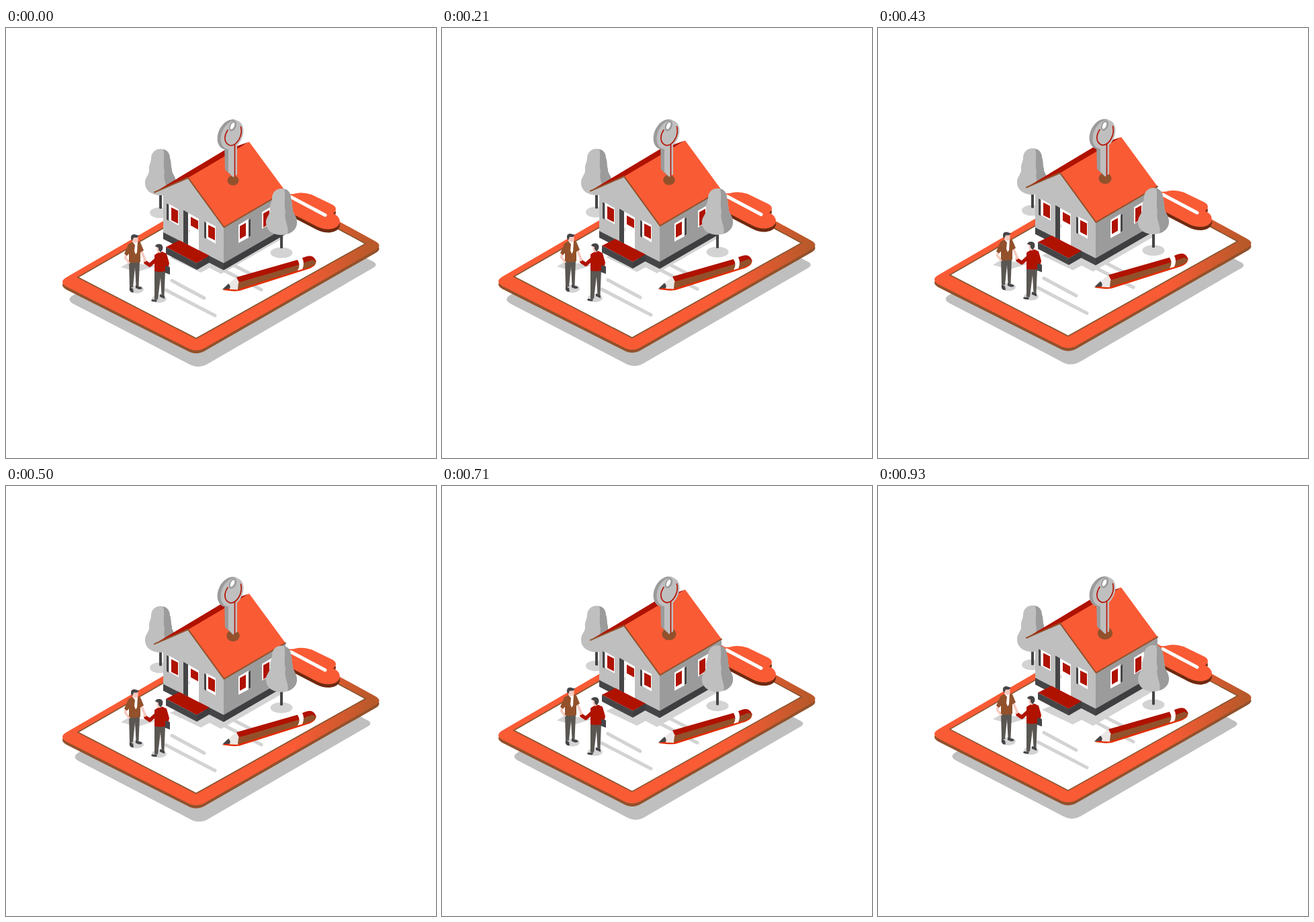
Animation, 640 px wide and 640 px high, one loop 1000 ms. Source, as an HTML page:

```html
<!DOCTYPE html>
<html lang="en">
<head>
<meta charset="utf-8">
<title>House deal</title>
<style>
  html, body { margin: 0; height: 100%; overflow: hidden; background: #fff; }
  svg { display: block; width: 100%; height: 100%; }
  .orange { fill: #f95b35; }
  .red { fill: #b01200; }
  .brown { fill: #92512b; }
  .light { fill: #bfbfbf; }
  .mid { fill: #9b9b9b; }
  .dark { fill: #454547; }
  .pale { fill: #d3d3d3; }
  .white { fill: #fff; }
  .skin { fill: #f5c9bf; }
  .pants { fill: #5a5652; }
  .line { fill: none; stroke-linecap: round; stroke-linejoin: round; }
</style>
</head>
<body>
<svg viewBox="0 0 640 640">
  <defs>
    <linearGradient id="rim" gradientUnits="userSpaceOnUse" x1="430" y1="0" x2="545" y2="0">
      <stop stop-color="#f95b35"/><stop offset="1" stop-color="#b9592a"/>
    </linearGradient>
    <path id="slab" d="M90 371Q78 378 90 385L270 476Q283 483.500 296 476L549 331Q562 324 549 317L372 220Q359 213 346 222Z"/>
    <path id="clip" d="M410 248L428 247Q440 243 455 248L486 263Q493 267 490 273L487 276Q497 280 497 289Q495 298 482 299.500Q472 300 462 295L410 268Z"/>
    <g id="tree">
      <rect class="dark" x="-2" y="66" width="4" height="23" rx="1.500"/>
      <path class="light" d="M0 0C8 0 14 6 14 14C16 18 15 24 17 31C16 36 24 42 23 52C22 62 12 69 0 69C-13 69-23 62-23 51C-24 43-16 38-17 31C-18 24-14 20-14 14C-14 6-8 0 0 0Z"/>
      <path class="mid" d="M4 .6C11 2 14 8 14 14C16 18 15 24 17 31C16 36 24 42 23 52C22 60 17 65 9 67.500C12 56 3 48 6 34C3 22 7 12 4 .6Z"/>
    </g>
  </defs>

  <g id="shade">
    <path class="light" d="M101 397Q88 404 101 411L272 500Q286 508 300 500L543 359Q558 352 543 346L360 246Z"/>
  </g>

  <g id="board">
    <use href="#slab" y="4.500" class="brown"/>
    <use href="#slab" fill="url(#rim)"/>
    <path d="M107 371L283 462L535 321L359 226Z" fill="#fff" stroke="#86542f" stroke-width="1.600"/>
    <use href="#clip" y="5" fill="#6e2a10"/>
    <use href="#clip" class="orange"/>
    <path class="line" d="M424 251.500L475 278.500" stroke="#fff" stroke-width="5"/>
    <ellipse class="pale" cx="229" cy="275" rx="15" ry="8"/>
    <ellipse class="pale" cx="410" cy="334.500" rx="16.500" ry="8"/>
    <path class="line" d="M247 376L295 402M238 390L311 428M298 347L380 389.500M325 346L370 369" stroke="#d3d3d3" stroke-width="5"/>
    <path class="pale" d="M244 342L290 364L303 357L320 366L414 312L340 300Z"/>
    <path class="pale" d="M171 356L183 349L224 354L195 363Z"/>
    <ellipse class="pale" cx="194" cy="389" rx="11" ry="6"/>
    <ellipse class="pale" cx="228" cy="403" rx="11" ry="6"/>
  </g>

  <use id="backTree" href="#tree"/>

  <g id="house">
    <path class="red" d="M220 245L325 182L362 169.500L272 224Z"/>
    <path class="light" d="M234 239L271 222L324 296V351L234 304Z"/>
    <path class="mid" d="M324 296L416 243V298L324 351Z"/>
    <path class="dark" d="M234 304L324 350V360.500L234 314Z"/>
    <path fill="#3e3e40" d="M324 350L416 297V307L324 360.500Z"/>
    <path class="orange" d="M271 223L362 169.500L416 243L324.500 296.500Z"/>
    <path class="line" d="M221 244.500L271 223L324.500 296.500L416 243" stroke="#92512b" stroke-width="2"/>

    <path class="white" d="M243 262L257 270V294L243 286ZM298 288L312 295V321L298 313ZM271 275L287 284V333L271 324Z"/>
    <path class="red" d="M246 267L256 272V291L246 286ZM301 293L311 298V316L301 311ZM275 281L286 287V300L275 294Z"/>
    <path class="dark" d="M239 261L242 263V287L239 285ZM295 288L298 290V314L295 312ZM264 271L271 275V323L264 319Z"/>
    <path class="line" d="M272.500 300V304" stroke="#bbb"/>
    <path class="white" d="M346 293L361 284V312L346 320ZM381 274L396 265V290L381 299Z"/>
    <path class="red" d="M348 295L357 290V309L348 314ZM383 276L392 271V291L383 297Z"/>
    <path class="dark" d="M361 286L364 284V309L361 311Z"/>

    <path class="red" d="M258 316L303 339L284 350L238 326Z"/>
    <path class="dark" d="M238 326L284 350V360L238 336Z"/>
    <path fill="#3e3e40" d="M284 350L303 339V349L284 360Z"/>
  </g>

  <g id="hole"><ellipse class="brown" rx="8.500" ry="7.300"/></g>

  <g id="key">
    <path class="mid" d="M325 172H333V214L338 222L326 211Z"/>
    <path class="light" d="M331 172H344V218L338 222L331 214Z"/>
    <ellipse class="mid" cx="332.500" cy="158.500" rx="16.500" ry="23.500" transform="rotate(25 332.500 158.500)"/>
    <ellipse class="light" cx="336.500" cy="159" rx="15.500" ry="22.500" transform="rotate(25 336.500 159)"/>
    <g transform="rotate(25 337.500 146)">
      <ellipse class="mid" cx="337.500" cy="146" rx="5" ry="8"/>
      <ellipse class="white" cx="337" cy="146" rx="2.600" ry="5.500"/>
    </g>
    <path class="line" d="M330 152C324 161 324 172 334 175C344 175 353 160 349.500 147M340.500 173V220" stroke="#b51507" stroke-width="1.700"/>
  </g>

  <use id="frontTree" href="#tree"/>

  <g id="front">
    <path class="pants" d="M183 347H199L197.500 384H193.500L192 356L189 386H184Z"/>
    <path class="dark" d="M184 385L189 388L190 393Q186 395 184 390ZM193 383L202 386Q204 389 198 389L193 387Z"/>
    <path class="line" d="M179 337L177.500 342L183 349M201.500 332L207.500 346" stroke="#f5c9bf" stroke-width="3.500"/>
    <path class="brown" d="M182 322Q187 318 191 318L200 319L205 331L200 334V348Q191 351 183 348V336L180 339L176 336Z"/>
    <path class="white" d="M188 318L196 318L195 334L193 337L191 332L192 323Z"/>
    <path class="skin" d="M188 311H196.500V317Q195 320 193 320L188 318Z"/>
    <path class="dark" d="M186 314Q185 307 191 307L198 309L195 312H190L188 317Z"/>

    <path class="pants" d="M221 361H237L235.500 399H231.500L230 371L226 404H221Z"/>
    <path class="dark" d="M217 404L225 404.500L224 407.500Q219 408 216 406ZM229 396L236 399V403L229 400Z"/>
    <path class="line" d="M224 344L214 353L208 349" stroke="#b01200" stroke-width="5.500"/>
    <circle class="skin" cx="206.500" cy="346" r="2.200"/>
    <path class="dark" d="M236 352L244 356V367L236 364Z"/>
    <path class="red" d="M221 338Q227 333 233 333L239 336L243 350L242 355L237 354V362Q229 364 221 362Z"/>
    <path class="skin" d="M224 326H231V334Q228 336 225 333Z"/>
    <path class="dark" d="M222 325Q223 321 229 321.500Q235 323 233 330L230 334L227 330V327Z"/>

    <path fill="#e32d00" d="M322 390L340 382L440 352L461 347Q463 353 452 358L348 391Q342 392 336 391.500Z"/>
    <path fill="#ebe7e5" d="M331 381L344 370Q348 380 345 389.500L333 389Z"/>
    <path class="dark" d="M322 389L331 380.500Q335 384 333 388Z"/>
    <path class="red" d="M343 371L434 345L438 353L347 379Z"/>
    <path class="brown" d="M346 379L437 352V360L345 389Z"/>
    <path class="red" d="M440 343Q455 335 460 344L462 348L442 351Z"/>
    <path class="brown" d="M442 350L456 345Q463 347 460 351Q457 355 442 359Z"/>
    <path class="white" d="M434 345L441 342.500Q445 350 441 359L434 361Q439 353 434 345Z"/>
  </g>
</svg>
<script>
  const LOOP = 1000, STEPS = 14;
  const place = (id, x, y, s = 1) =>
    document.getElementById(id).setAttribute('transform', `translate(${x} ${y}) scale(${s})`);

  function draw(now) {
    const step = Math.floor((now % LOOP) / LOOP * STEPS + 0.08) % STEPS;
    const k = (1 - Math.cos(Math.PI * step / STEPS)) / 2;   // eased rise, 0 to 1
    const s = 1 - 0.071 * k;
    place('shade', 322.5 * (1 - s), 378 * (1 - s), s);
    place('board', 0, -9 * k);
    place('front', 0, -9 * k);
    place('house', 0, -18.7 * k);
    place('hole', 338, 227 - 8 * k, 1 + 0.3 * k);
    place('key', 0, -1.7 * k);
    place('backTree', 230, 180 - 2.3 * k);
    place('frontTree', 410, 239 - 2.3 * k);
  }

  let start;
  function tick(now) {
    start ??= now;
    draw(now - start);
    requestAnimationFrame(tick);
  }
  draw(0);
  requestAnimationFrame(tick);
</script>
</body>
</html>
```
